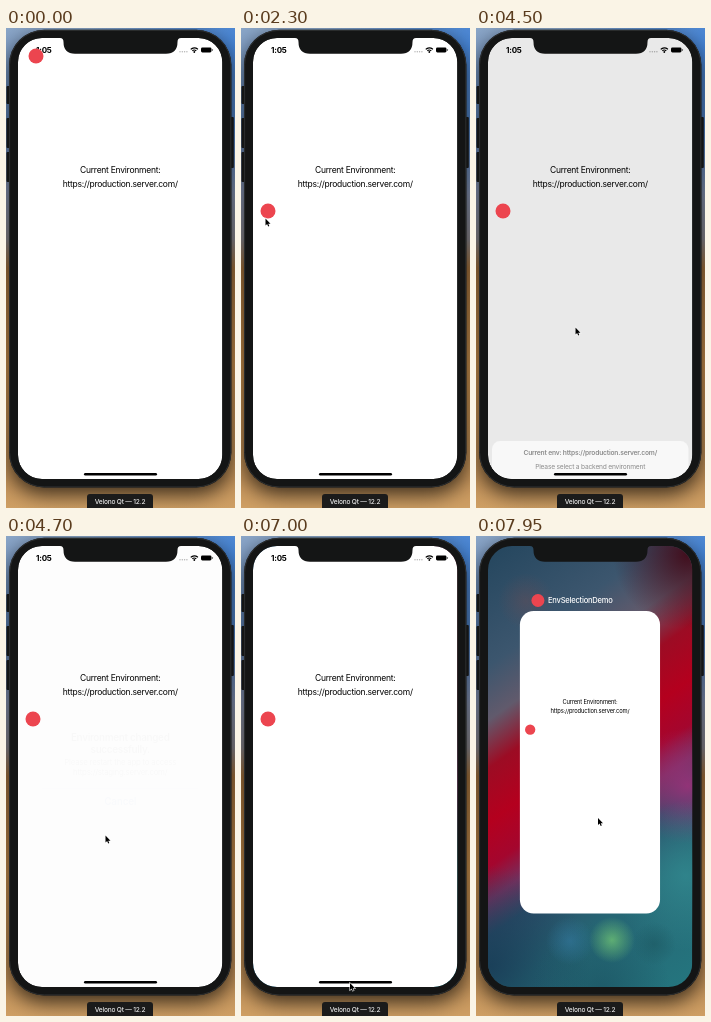
Recreate the animation shown at these times as an HTML page with a canvas. Size 229x480 px, loop 8000 ms.

```html
<!DOCTYPE html>
<html lang="en">
<head>
<meta charset="utf-8">
<title>Environment picker</title>
<style>
html, body { margin: 0; width: 100%; height: 100%; overflow: hidden; }
canvas { display: block; width: 229px; height: 480px; }
</style>
</head>
<body>
<canvas id="stage"></canvas>
<script>
const W = 229, H = 480, LOOP = 8000;
const SX = 12, SY = 10, SW = 204.3, SH = 441, MID = 114.2, CORNER = 24;
const BLUE = '#1478e0', RED = '#ec454f', BODY = '#141515';
const canvas = document.getElementById('stage');
const c = canvas.getContext('2d');
const dpr = window.devicePixelRatio || 1;
canvas.width = W * dpr;
canvas.height = H * dpr;

// Each key is [time, ...values]; motion eases between keys.
const cursorKeys = [
  [400, 62, 484], [1050, 28, 36], [1150, 28, 36], [2050, 24.5, 190.5],
  [2500, 24.5, 190.5], [3250, 68.5, 209.5], [4000, 99.5, 299.5],
  [4950, 99.5, 299.5], [5650, 104.5, 260], [6200, 104.5, 260],
  [6900, 109, 447], [7000, 109, 447], [7550, 115.5, 341.5], [7850, 122, 282]
];
const bubbleKeys = [[1150, 30, 28], [2050, 27, 183]];
// Centre x, top and scale of the app card.
const cardKeys = [[7000, MID, SY, 1], [7550, 121, 54, 0.69], [7900, 114, 75, 0.686]];

const clamp = v => Math.max(0, Math.min(1, v));
const smooth = v => v * v * (3 - 2 * v);
const ramp = (t, from, length) => smooth(clamp((t - from) / length));

function track(keys, t) {
  let i = 0;
  while (i < keys.length - 2 && t > keys[i + 1][0]) i++;
  const [a, b] = [keys[i], keys[i + 1]];
  const k = ramp(t, a[0], b[0] - a[0]);
  return a.slice(1).map((v, n) => v + (b[n + 1] - v) * k);
}

function box(x, y, w, h, r, fill) {
  c.beginPath();
  c.roundRect(x, y, w, h, r);
  if (fill) { c.fillStyle = fill; c.fill(); }
}

function disc(x, y, r, fill) {
  c.beginPath();
  c.arc(x, y, r, 0, 7);
  c.fillStyle = fill;
  c.fill();
}

function text(str, x, y, size, fill = '#000', weight = 400, align = 'center') {
  c.font = `${weight} ${size}px Inter, "Liberation Sans", sans-serif`;
  c.letterSpacing = -0.03 * size + 'px';
  c.textAlign = align;
  c.fillStyle = fill;
  c.fillText(str, x, y + size * 0.36);
}

function gradient(x0, y0, x1, y1, stops) {
  const g = c.createLinearGradient(x0, y0, x1, y1);
  stops.forEach(([p, col]) => g.addColorStop(p, col));
  return g;
}

function glow(x, y, r, rgb, alpha) {
  const g = c.createRadialGradient(x, y, 0, x, y, r);
  g.addColorStop(0, `rgba(${rgb},${alpha})`);
  g.addColorStop(1, `rgba(${rgb},0)`);
  c.fillStyle = g;
  c.fillRect(x - r, y - r, 2 * r, 2 * r);
}

function faded(alpha, draw) {
  if (alpha <= 0) return;
  c.save();
  c.globalAlpha *= alpha;
  draw();
  c.restore();
}

function phone() {
  c.fillStyle = gradient(0, 0, 0, H, [
    [0, '#8ba6c8'], [0.2, '#5f87bd'], [0.34, '#8794b2'], [0.44, '#8d8a90'],
    [0.5, '#a9763f'], [0.7, '#cc924e'], [0.94, '#c4935a'], [1, '#cf9f64']
  ]);
  c.fillRect(0, 0, W, H);
  glow(229, 20, 150, '62,128,214', 0.9);
  c.save();
  c.shadowColor = 'rgba(0,0,0,.7)';
  c.shadowBlur = 20 * dpr;
  c.shadowOffsetY = 7 * dpr;
  box(3, 1.8, 222.4, 457.7, 35, BODY);
  c.restore();
  [[0.5, 58, 18], [0.5, 90, 30], [0.5, 124, 30], [224.5, 89, 51]]
    .forEach(([x, y, h]) => box(x, y, 3.3, h, 1, BODY));
  box(3.6, 2.4, 221.2, 456.5, 34.5);
  c.strokeStyle = '#2d2f30';
  c.lineWidth = 1;
  c.stroke();
  box(81, 466, 66, 16, 3, '#1b1b1b');
  text('Velono Qt — 12.2', 114, 473.5, 6.6, '#e8e8e8', 500);
}

function homeScreen() {
  // Diagonal bands rising from lower left to upper right.
  c.fillStyle = gradient(12, 10, 296, 410, [
    [0, '#24465e'], [0.2, '#3c566e'], [0.29, '#615a6c'], [0.37, '#9c0c24'],
    [0.46, '#b4001e'], [0.535, '#a4062e'], [0.59, '#74305e'],
    [0.65, '#2c4c68'], [0.76, '#266674'], [1, '#247880']
  ]);
  c.fillRect(SX, SY, SW, SH);
  glow(212, 18, 75, '62,0,14', 0.85);
  glow(212, 250, 58, '160,48,122', 0.85);
  glow(210, 340, 75, '50,138,144', 0.8);
  glow(14, 430, 100, '24,60,86', 0.85);
  glow(125, 455, 70, '26,78,94', 0.6);
  glow(50, 65, 28, '120,75,80', 0.35);
  glow(94, 405, 24, '52,120,160', 0.6);
  glow(136, 404, 23, '104,186,116', 0.85);
  glow(178, 408, 22, '28,88,98', 0.6);
}

function statusBar() {
  text('1:05', 30, 22, 8, '#000', 700, 'left');
  for (let i = 0; i < 4; i++) disc(174 + i * 2.3, 23.8, 0.7, 'rgba(0,0,0,.3)');
  c.strokeStyle = '#000';
  c.lineWidth = 1.2;
  [2.6, 4.8].forEach(r => {
    c.beginPath();
    c.arc(188.3, 24.6, r, -2.4, -0.74);
    c.stroke();
  });
  disc(188.3, 24, 0.9, '#000');
  box(195, 19.5, 10.5, 5, 1.4, '#000');
  box(206, 21, 0.9, 2, 0.4, '#555');
}

function homeBar() {
  box(78, 445, 73, 2.4, 1.2, '#000');
}

function sheet(offset) {
  c.save();
  c.translate(0, offset);
  box(16, 220, 196.5, 183, 8, '#f8f8f8');
  text('Current env: https://production.server.com/', MID, 231, 6.7, '#8c8c8c', 600);
  text('Please select a backend environment', MID, 245, 6.65, '#8c8c8c');
  ['https://production.server.com/', 'https://staging.server.com/',
   'https://development.server.com', 'https://10.0.1.1/', 'edge.server.com']
    .forEach((url, i) => {
      const y = 261 + i * 28.4;
      c.fillStyle = '#dcdcde';
      c.fillRect(16, y, 196.5, 0.6);
      text(url, MID, y + 14.3, 9.6, BLUE);
    });
  box(16, 406.5, 196.5, 28, 8, '#fff');
  text('Cancel', MID, 420.7, 9.9, BLUE, 600);
  c.restore();
}

function alertBox(scale) {
  c.save();
  c.translate(MID, 231);
  c.scale(scale, scale);
  c.translate(-MID, -231);
  box(48, 191, 132.7, 79.6, 7, '#f8f8f8');
  text('Environment changed', MID, 205.8, 8.4, '#000', 600);
  text('successfully.', MID, 216.2, 8.4, '#000', 600);
  text('Please restart the app to access', MID, 226.8, 6.7);
  text('https://staging.server.com/', MID, 235, 6.7);
  c.fillStyle = '#d4d4d6';
  c.fillRect(48, 249, 132.7, 0.6);
  text('Cancel', MID, 260, 8.5, BLUE, 600);
  c.restore();
}

function app(t) {
  const [cx, top, scale] = track(cardKeys, t);
  const lift = ramp(t, 7000, 550);
  c.save();
  c.translate(cx, top);
  c.scale(scale, scale);
  c.translate(-MID, -SY);
  box(SX, SY, SW, SH, CORNER - 4 * lift, '#fff');
  c.clip();
  faded(1 - ramp(t, 7000, 250), statusBar);
  text('Current Environment:', MID, 141.8, 8.5);
  text('https://production.server.com/', MID, 156, 8.5);

  const sheetIn = ramp(t, 2400, 450) * (1 - ramp(t, 4200, 420));
  const alertIn = ramp(t, 4680, 260);
  const alertOn = alertIn * (1 - ramp(t, 6080, 260));
  c.fillStyle = `rgba(0,0,0,${0.435 * Math.max(sheetIn, alertOn)})`;
  c.fillRect(SX, SY, SW, SH);
  if (sheetIn > 0) sheet(240 * (1 - sheetIn));
  faded(alertOn, () => alertBox(1.18 - 0.18 * alertIn));
  const [bx, by] = track(bubbleKeys, t);
  disc(bx, by, 7.5, RED);
  faded(1 - ramp(t, 7550, 250), homeBar);
  c.restore();

  faded(0.2 * ramp(t, 7350, 200) + 0.8 * ramp(t, 7550, 300), () => {
    const left = cx - SW * scale / 2;
    disc(left + 18, top - 10.5, 6.5, RED);
    text('EnvSelectionDemo', left + 28, top - 10.5, 7.6, '#fff', 500, 'left');
  });
}

function notch() {
  c.fillStyle = BODY;
  c.beginPath();
  c.moveTo(54, 9);
  c.lineTo(54, 10);
  c.quadraticCurveTo(57.5, 10, 57.5, 14);
  c.quadraticCurveTo(57.5, 25.7, 69, 25.7);
  c.lineTo(160, 25.7);
  c.quadraticCurveTo(171.5, 25.7, 171.5, 14);
  c.quadraticCurveTo(171.5, 10, 175, 10);
  c.lineTo(175, 9);
  c.fill();
}

function cursor(x, y) {
  c.save();
  c.translate(x, y);
  c.scale(0.86, 0.86);
  c.beginPath();
  [[0, 0], [0, 8.2], [1.9, 6.5], [3.1, 9.2], [4.4, 8.7], [3.2, 6.1], [5.8, 6.1]]
    .forEach(p => c.lineTo(...p));
  c.closePath();
  c.strokeStyle = '#fff';
  c.lineWidth = 1.2;
  c.stroke();
  c.fillStyle = '#000';
  c.fill();
  c.restore();
}

function frame(now) {
  const t = now % LOOP;
  c.setTransform(dpr, 0, 0, dpr, 0, 0);
  phone();
  c.save();
  box(SX, SY, SW, SH, CORNER);
  c.clip();
  if (t > 7000) homeScreen();
  app(t);
  c.restore();
  notch();
  if (t > 400) cursor(...track(cursorKeys, t));
  requestAnimationFrame(frame);
}
requestAnimationFrame(frame);
</script>
</body>
</html>
```
